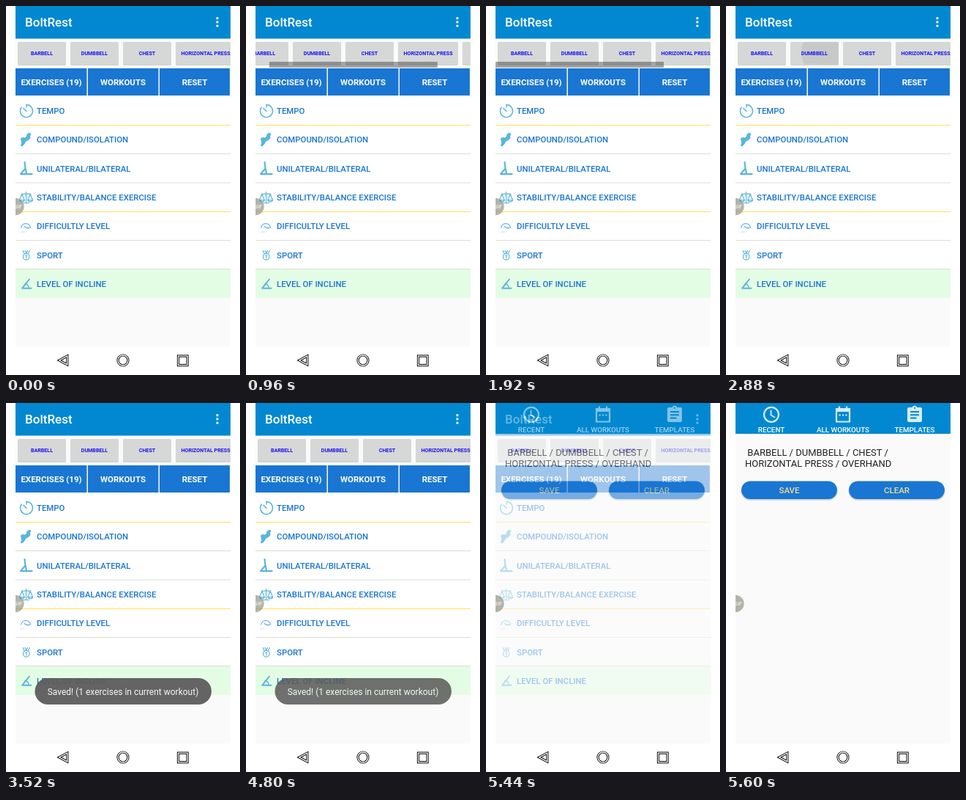
These frames come from a looping animation (320x503 px, 7.84 s). An HTML page:

```html
<!DOCTYPE html>
<html lang="en">
<head>
<meta charset="utf-8">
<title>Workout picker</title>
<style>
  html, body { margin: 0; width: 100%; height: 100%; overflow: hidden; background: #fff; }
  svg { display: block; width: 100%; height: 100%; font-family: Roboto, Arial, sans-serif; }
  .mid { text-anchor: middle; }
  .title { font-size: 17px; font-weight: 500; fill: #fff; }
  .chips text { font-size: 7.15px; font-weight: 700; fill: #1a12f0; text-anchor: middle; }
  .tabs text { font-size: 11.5px; font-weight: 700; fill: #fff; text-anchor: middle; }
  .rows text { font-size: 11.4px; font-weight: 500; fill: #1976d2; }
  .icons { fill: none; stroke: #5ab5dd; stroke-width: 1.5; stroke-linecap: round; stroke-linejoin: round; }
  .icons .solid { fill: #5ab5dd; }
  .menu text { font-size: 9.8px; font-weight: 500; fill: #fff; text-anchor: middle; }
  .picked { font-size: 13px; fill: #212121; white-space: pre; }
  .pills text { font-size: 11.5px; font-weight: 500; fill: #f3dc8c; text-anchor: middle; }
  .toast text { font-size: 12px; fill: #f6f6f6; text-anchor: middle; }

  /* The screen refreshes every 160 ms, so every track holds its value between keys. */
  .scroll, .thumb, .thumb-fade, .ripple, .toast, .next { animation: 7840ms step-end infinite; }
  .scroll { animation-name: scroll; }
  .thumb { animation-name: thumb; }
  .thumb-fade { animation-name: thumb-fade; }
  .ripple { animation-name: ripple; transform-origin: 136px 63px; }
  .toast { animation-name: toast; }
  .next { animation-name: next; }

  @keyframes scroll {
    0% { transform: translateX(0); }
    12.244% { transform: translateX(-24px); }
    14.285% { transform: translateX(-60px); }
    16.326% { transform: translateX(-82px); }
    18.367% { transform: translateX(-62px); }
    20.408% { transform: translateX(-30px); }
    22.448% { transform: translateX(-8px); }
    24.489%, 100% { transform: translateX(0); }
  }
  @keyframes thumb {
    0% { transform: translateX(0); }
    12.244% { transform: translateX(18.8px); }
    14.285% { transform: translateX(46.9px); }
    16.326% { transform: translateX(64px); }
    18.367% { transform: translateX(48.5px); }
    20.408% { transform: translateX(23.5px); }
    22.448% { transform: translateX(6.3px); }
    24.489%, 100% { transform: translateX(0); }
  }
  @keyframes thumb-fade {
    0% { opacity: 0; }
    12.244% { opacity: 1; }
    32.653% { opacity: .6; }
    34.693% { opacity: .15; }
    36.734%, 100% { opacity: 0; }
  }
  @keyframes ripple {
    0% { opacity: 0; transform: scale(.3); }
    34.693% { opacity: .6; transform: scale(.5); }
    36.734% { opacity: 1; transform: scale(1); }
    38.775% { opacity: 1; transform: scale(1.5); }
    40.816% { opacity: 1; transform: scale(1.8); }
    42.857% { opacity: .5; transform: scale(1.8); }
    44.897%, 100% { opacity: 0; transform: scale(1.8); }
  }
  @keyframes toast {
    0% { opacity: 0; }
    40.816% { opacity: .25; }
    42.857% { opacity: .75; }
    44.897% { opacity: 1; }
    61.224% { opacity: .92; }
    63.265% { opacity: .72; }
    65.306% { opacity: .48; }
    67.346% { opacity: .2; }
    69.387%, 100% { opacity: 0; }
  }
  @keyframes next {
    0% { opacity: 0; }
    69.387% { opacity: .6; }
    71.428%, 100% { opacity: 1; }
  }
</style>
</head>
<body>
<svg viewBox="0 0 320 503">
  <defs>
    <clipPath id="strip"><rect x="13" y="45" width="294" height="40"/></clipPath>
    <clipPath id="pressed"><rect x="88" y="49" width="66" height="30.5" rx="1.5"/></clipPath>
    <clipPath id="screen"><rect x="13.5" y="0" width="293.5" height="464"/></clipPath>
    <g id="chip">
      <rect y="50" width="66" height="31" rx="1.5" fill="#000" opacity=".16"/>
      <rect y="49" width="66" height="30.5" rx="1.5" fill="#d6d7d7"/>
    </g>
    <g id="pill">
      <rect x="20.5" y="108" width="132" height="25" rx="12.5" fill="#000" opacity=".14"/>
      <rect x="21" y="106.5" width="131" height="24.5" rx="12.2" fill="#1976d2"/>
    </g>
    <g id="keys" fill="none" stroke-linejoin="miter">
      <path d="M83.8 477.2V488.8L72.8 483Z"/>
      <circle cx="160" cy="483" r="7"/>
      <path d="M235.5 477.2h12.6v12.4h-12.6z"/>
    </g>
  </defs>

  <rect x="13" width="294" height="464" fill="#fafafa"/>

  <!-- Exercise screen -->
  <rect x="13" width="294" height="44.5" fill="#0288d1"/>
  <text class="title" x="26" y="28">BoltRest</text>
  <g fill="#fff">
    <circle cx="289" cy="16.7" r="1.7"/><circle cx="289" cy="21.9" r="1.7"/><circle cx="289" cy="27.1" r="1.7"/>
  </g>

  <g clip-path="url(#strip)">
    <g class="scroll chips">
      <use href="#chip" x="16"/>
      <use href="#chip" x="88"/>
      <use href="#chip" x="160"/>
      <rect x="232" y="50" width="82" height="31" rx="1.5" fill="#000" opacity=".16"/>
      <rect x="232" y="49" width="82" height="30.5" rx="1.5" fill="#d6d7d7"/>
      <use href="#chip" x="320"/>
      <g clip-path="url(#pressed)"><circle class="ripple" cx="136" cy="63" r="33" fill="#000" fill-opacity=".065"/></g>
      <text x="49" y="67">BARBELL</text>
      <text x="121" y="67">DUMBBELL</text>
      <text x="193" y="67">CHEST</text>
      <text x="273" y="67">HORIZONTAL PRESS</text>
      <text x="353" y="67">OVERHAND</text>
    </g>
    <g class="thumb-fade"><rect class="thumb" x="13" y="76" width="230" height="8" fill="#000" fill-opacity=".34"/></g>
  </g>

  <g class="tabs">
    <path d="M13 85H110.5V122H13ZM112 85H208.5V122H112ZM210 85H306V122H210Z" fill="#1976d2"/>
    <text x="62" y="107.7">EXERCISES (19)</text>
    <text x="160" y="107.7">WORKOUTS</text>
    <text x="258" y="107.7">RESET</text>
  </g>

  <g class="rows">
    <rect x="13" y="123" width="294" height="236" fill="#fff"/>
    <rect x="13" y="359" width="294" height="39" fill="#e3fde4"/>
    <path d="M13 162.5H307M13 280.5H307" stroke="#ffe257"/>
    <path d="M13 201.5H307M13 241H307M13 319.5H307M13 358.5H307" stroke="#dcdcd8"/>
    <text x="42" y="147">TEMPO</text>
    <text x="42" y="186.3">COMPOUND/ISOLATION</text>
    <text x="42" y="225.7">UNILATERAL/BILATERAL</text>
    <text x="42" y="265">STABILITY/BALANCE EXERCISE</text>
    <text x="42" y="304.2">DIFFICULTLY LEVEL</text>
    <text x="42" y="343.6">SPORT</text>
    <text x="42" y="382.8">LEVEL OF INCLINE</text>
  </g>

  <g class="icons">
    <path d="M28 138V134.6A8.5 8.5 0 1 1 21.2 138M23.8 139.2L28 143.4"/>
    <path class="solid" stroke-width="1" d="M31 173.5l3 .5-1.5 3 .5 3-3 3-3 1-2 4-3 3-1.5-.5 1-4-.5-3-.5-3 2.500-1 3 .5 2-1.500 1-3z"/>
    <path stroke-width="2.200" d="M25.500 213L26.500 221.500L20.500 228.500M20 229.200H35.500M26.500 221.500L28 228"/>
    <g stroke-width="1.200">
      <path d="M27.500 253.500V268M23.500 268.500H31.500M21.500 256.200H33.500"/>
      <path d="M21.800 256.500L18.500 264.500H25.200ZM33.200 256.500L29.800 264.500H36.500Z"/>
      <path d="M18.500 264.500a3.400 2.600 0 0 0 6.700 0M29.800 264.500a3.400 2.600 0 0 0 6.700 0"/>
    </g>
    <path stroke-width="1.300" d="M20.700 302A6.500 6.500 0 0 1 33.500 302M25 300.500L28 302.500H32"/>
    <path stroke-width=".7" opacity=".5" d="M20 308H26"/>
    <g stroke-width="1.200">
      <path d="M23.200 333.500L25.200 338M32.200 333.500L30.200 338M26 333.500L27.700 337L29.400 333.500"/>
      <circle cx="27.700" cy="341.800" r="4.300"/>
      <path d="M26.800 340.500L28 339.700V344"/>
    </g>
    <path stroke-width="1.900" d="M32 372.500L22 384.800H34.500"/>
    <path stroke-width="1.400" d="M26 378.500Q31 379.500 31 384.500"/>
  </g>

  <g class="toast">
    <rect x="39.500" y="375" width="241.500" height="36" rx="18" fill="#5c5c5c" fill-opacity=".95"/>
    <text x="160" y="397.600">Saved! (1 exercises in current workout)</text>
  </g>

  <!-- Workout screen -->
  <g class="next">
    <rect x="13" width="294" height="464" fill="#fafafa"/>
    <rect x="13" width="294" height="42" fill="#0288d1"/>
    <g fill="none" stroke="#d6edf8" stroke-width="2.200">
      <circle cx="62" cy="15.800" r="10"/>
      <path d="M61.500 9.500V16.500L67 19.800" stroke-width="1.800"/>
      <path d="M151 8H169V25.500H151Z"/>
      <path d="M151 9.700H169" stroke-width="4.500"/>
      <path d="M155 4.500V8M165 4.500V8"/>
      <path d="M154.500 16.500H165.500" stroke-width="2.200" stroke-dasharray="2.200"/>
    </g>
    <path d="M250 6H254.500A3.700 3.700 0 0 1 261.500 6H266Q268 6 268 8V24Q268 26 266 26H250Q248 26 248 24V8Q248 6 250 6Z" fill="#d6edf8"/>
    <circle cx="258" cy="6.800" r="1.100" fill="#0288d1"/>
    <path d="M252 12H264M252 16.300H264M252 20.600H260.500" stroke="#0288d1" stroke-width="2"/>
    <g class="menu">
      <text x="62" y="39.700">RECENT</text>
      <text x="160" y="39.700">ALL WORKOUTS</text>
      <text x="258" y="39.700">TEMPLATES</text>
    </g>
    <g class="picked">
      <text x="29.300" y="71.600">BARBELL / DUMBBELL / CHEST /</text>
      <text x="26" y="87">HORIZONTAL PRESS / OVERHAND</text>
    </g>
    <g class="pills">
      <use href="#pill"/>
      <use href="#pill" x="147"/>
      <text x="86.500" y="123">SAVE</text>
      <text x="233.500" y="123">CLEAR</text>
    </g>
  </g>

  <!-- Floating badge and system keys -->
  <g clip-path="url(#screen)">
    <circle cx="12.800" cy="273.500" r="11.800" fill="#8f9083" fill-opacity=".68"/>
    <text class="mid" x="16.500" y="276.200" font-size="7.500" fill="#fff">GIF</text>
  </g>
  <use href="#keys" stroke="#000" stroke-width="3.200"/>
  <use href="#keys" stroke="#fff" stroke-width="1.300"/>
</svg>
</body>
</html>
```
